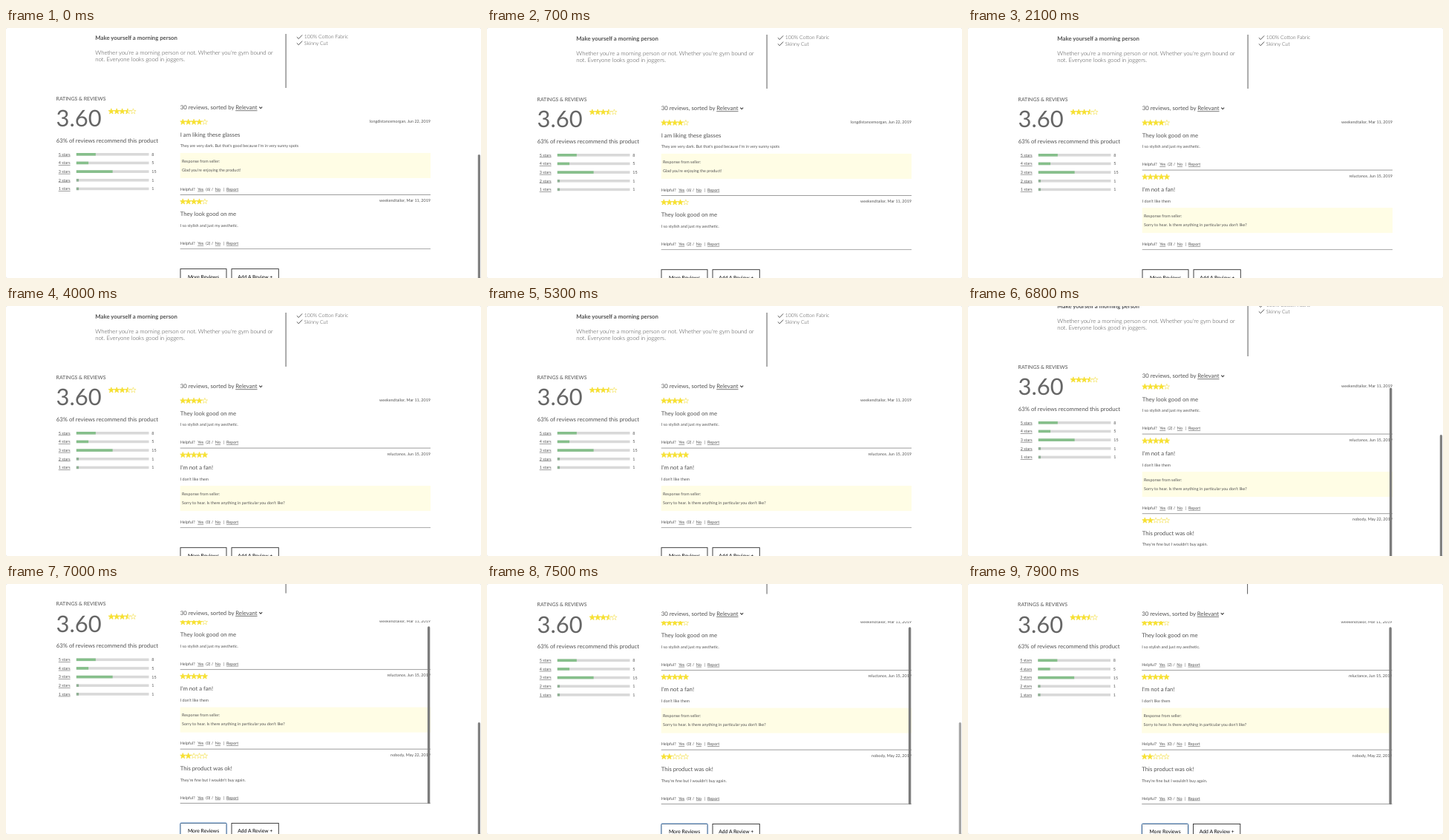
Recreate the animation shown at these times as an HTML page. Size 640 by 338 pixels, loop 8 s.

```html
<!DOCTYPE html>
<html lang="en">
<head>
<meta charset="utf-8">
<title>Ratings and reviews</title>
<style>
  html, body { margin: 0; width: 100%; height: 100%; overflow: hidden; background: #e6e6e6; }
  #stage { display: block; width: 100vw; height: 100vh; }
  text { font-family: Lato, "Open Sans", sans-serif; fill: #525252; text-rendering: geometricPrecision; white-space: pre; }
  .light { font-weight: 300; fill: #444; }
  .bold { font-weight: 700; }
  .link { text-decoration: underline; }
  .button { fill: #000; }
</style>
</head>
<body>
<svg id="stage" viewBox="0 0 640 338" xmlns="http://www.w3.org/2000/svg"></svg>
<script>
const LOOP = 8000, STEP = 100;
const REPORTED = 2000, LOADED = 5500;
const LIST_TOP = 118.7, LIST_MAX = 248;
const SMALL = 5.46, BASE = 6.92, LARGE = 7.76, HUGE = 30.9;

const text = (x, y, size, value, cls = '', extra = '') =>
  `<text x="${x}" y="${y}" font-size="${size}" class="${cls}" ${extra}>${value}</text>`;
const rect = (x, y, w, h, fill, extra = '') =>
  `<rect x="${x}" y="${y}" width="${w}" height="${h}" fill="${fill}" ${extra}/>`;
const line = (d, color, width) =>
  `<path d="${d}" fill="none" stroke="${color}" stroke-width="${width}"/>`;

function starPath(cx, cy, r) {
  const points = Array.from({ length: 10 }, (_, i) => {
    const a = -Math.PI / 2 + i * Math.PI / 5, k = i % 2 ? r * 0.4 : r;
    return `${(cx + k * Math.cos(a)).toFixed(2)} ${(cy + k * Math.sin(a)).toFixed(2)}`;
  });
  return `M${points.join('L')}Z`;
}

// Five outlined stars, filled from the left up to the rating.
function stars(x, cy, rating) {
  const pitch = 7.4;
  const d = [0, 1, 2, 3, 4].map(i => starPath(3.8 + i * pitch, 4.9, 3.9)).join('');
  return `<svg x="${x}" y="${cy - 4.7}" width="38" height="9.5">
      <path d="${d}" fill="none" stroke="#f2dc3c" stroke-width=".55"/></svg>
    <svg x="${x}" y="${cy - 4.7}" width="${rating * pitch + 0.1}" height="9.5">
      <path d="${d}" fill="#f8e22c" stroke="#f2dc3c" stroke-width=".4"/></svg>`;
}

const REVIEWS = [
  { author: 'longdistancemorgan, Jun 22, 2019', rating: 4, title: 'I am liking these glasses',
    body: "They are very dark. But that's good because I'm in very sunny spots",
    reply: "Glad you're enjoying the product!", votes: 6 },
  { author: 'weekendtailor, Mar 11, 2019', rating: 4, title: 'They look good on me',
    body: 'I so stylish and just my aesthetic.', votes: 2 },
  { author: 'reluctance, Jun 15, 2019', rating: 5, title: "I'm not a fan!", body: "I don't like them",
    reply: "Sorry to hear. Is there anything in particular you don't like?", votes: 0 },
  { author: 'nobody, May 22, 2019', rating: 2, title: 'This product was ok!',
    body: "They're fine but I wouldn't buy again.", votes: 0 },
];
REVIEWS.forEach(r => { r.height = r.reply ? 107.6 : 73.2; });

function review(r, i) {
  const foot = r.height - 5.6;
  const reply = r.reply
    ? rect(234.7, 51.2, 337.3, 34, '#fffde5') +
      text(237, 64, SMALL, 'Response from seller:') + text(237, 76, SMALL, r.reply)
    : '';
  return `<g id="review${i}">` + stars(234.5, 9.3, r.rating) +
    text(572, 9.9, SMALL, r.author, '', 'text-anchor="end"') +
    text(234.7, 29, LARGE, r.title) + text(234.7, 43.7, SMALL, r.body) + reply +
    text(234.7, foot, SMALL, 'Helpful?') + text(258.2, foot, SMALL, 'Yes', 'link') +
    text(269.2, foot, SMALL, `(${r.votes}) /`) + text(281.8, foot, SMALL, 'No', 'link') +
    text(292.6, foot, SMALL, '|') + text(297, foot, SMALL, 'Report', 'link') +
    line(`M234.7 ${r.height + 0.2}H572`, '#858585', 0.8) + '</g>';
}

function description() {
  return text(120.3, 16.7, LARGE, 'Make yourself a morning person', 'bold') +
    text(120.3, 36.7, LARGE, "Whether you're a morning person or not. Whether you're gym bound or", 'light') +
    text(120.3, 46.2, LARGE, 'not. Everyone looks good in joggers.', 'light') +
    line('M377.1 9V82', '#4a4a4a', 0.9) +
    [['100% Cotton Fabric', 15.4], ['Skinny Cut', 23.6]].map(([label, y]) =>
      line(`M391.8 ${y - 2.2}l2.5 2.4 4.8-5.2`, '#444', 0.9) + text(401.8, y, BASE, label, 'light')).join('');
}

function summary() {
  const bars = [8, 5, 15, 1, 1].map((count, i) => {
    const y = 171.8 + i * 11.65;
    return text(70.7, y + 1.8, SMALL, `${5 - i} stars`, 'link') +
      rect(94.8, y - 1.8, 97.7, 3.6, '#d9d9d9') +
      rect(94.8, y - 1.8, 97.7 * count / 30, 3.6, count > 1 ? '#86bf8b' : '#8fb094') +
      text(196.3, y + 1.9, SMALL, count);
  }).join('');
  return text(67.6, 98.7, BASE, 'RATINGS &amp; REVIEWS') +
    text(67.6, 134, HUGE, '3.60', '', 'style="fill:#666"') + stars(138, 113.6, 3.55) +
    text(67.8, 155.9, LARGE, '63% of reviews recommend this product') + bars;
}

function buttons() {
  const box = (id, x, w) => rect(x, 0, w, 21, '#fff', `id="${id}" stroke="#2b2b2b" stroke-width=".9"`);
  return '<g id="buttons">' +
    rect(234.4, -0.7, 63.2, 22.4, 'none', 'id="halo" rx="1.8" stroke="#a9c9ee" stroke-width="1"') +
    box('more', 235, 62) + text(266, 13, 6.8, 'More Reviews', 'button', 'text-anchor="middle"') +
    box('add', 304, 63.3) + text(335.7, 13, 6.8, 'Add A Review +', 'button', 'text-anchor="middle"') + '</g>';
}

const stage = document.getElementById('stage');
stage.innerHTML = rect(0, 0, 640, 338, '#fff', 'rx="2.5"') + '<g id="page">' + description() + summary() +
  text(234.7, 111.4, LARGE, '30 reviews, sorted by <tspan class="link">Relevant</tspan>') +
  line('M341.2 107.6l2 2 2-2', '#444', 1.1) +
  `<svg id="list" x="0" y="${LIST_TOP}" width="640"><g id="items">${REVIEWS.map(review).join('')}</g></svg>` +
  buttons() + rect(567.9, LIST_TOP, 3.4, 240, '#7d7d7d', 'id="listBar" rx="1.7"') + '</g>' +
  rect(635.8, 0, 3.2, 190, '#808080', 'id="pageBar" rx="1.6"');

const $ = id => document.getElementById(id);
const set = (id, attrs) => Object.entries(attrs).forEach(([k, v]) => $(id).setAttribute(k, v));
const move = (id, x, y) => set(id, { transform: `translate(${x} ${y})` });

// Linear interpolation through [time, value] pairs.
function track(t, keys) {
  const i = keys.findIndex(k => k[0] > t);
  if (i === 0) return keys[0][1];
  if (i < 0) return keys[keys.length - 1][1];
  const [t0, a] = keys[i - 1], [t1, b] = keys[i];
  return a + (b - a) * (t - t0) / (t1 - t0);
}

function draw(time) {
  const t = Math.floor((time % LOOP) / STEP) * STEP;
  const shown = t < REPORTED ? [0, 1] : t < LOADED ? [1, 2] : [1, 2, 3];
  let height = 0;
  REVIEWS.forEach((r, i) => {
    const visible = shown.includes(i);
    set(`review${i}`, { display: visible ? 'inline' : 'none' });
    if (!visible) return;
    move(`review${i}`, 0, height);
    height += r.height;
  });
  const listHeight = Math.min(height + 1, LIST_MAX);
  const inner = track(t, [[6700, 0], [6800, 5], [6900, 7]]);
  const scroll = track(t, [[0, 1], [200, 0], [6700, 0], [6800, 14], [6900, 52], [7000, 69.5], [7200, 69.5], [7500, 68.5]]);
  const shift = track(t, [[7600, 0], [7800, -0.5]]);

  move('page', shift, -scroll);
  set('list', { height: listHeight });
  move('items', 0, -inner);
  move('buttons', 0, LIST_TOP + listHeight + 26.2);
  const focused = t >= LOADED;
  set('more', { stroke: focused ? '#34597f' : '#2b2b2b', rx: focused ? 1 : 0 });
  set('halo', { display: focused ? 'inline' : 'none' });

  move('listBar', 0, inner * 8 / 7);
  set('listBar', { opacity: t >= 6800 ? 1 : 0 });
  set('pageBar', {
    y: 171 + (scroll - 1) * 16 / 68,
    opacity: track(t, [[0, 1], [200, 0], [6700, 0], [6800, 1], [7400, 1], [7500, 0.7], [7700, 0]]),
  });
}

const start = performance.now();
function tick() {
  draw(performance.now() - start);
  requestAnimationFrame(tick);
}
tick();
</script>
</body>
</html>
```
